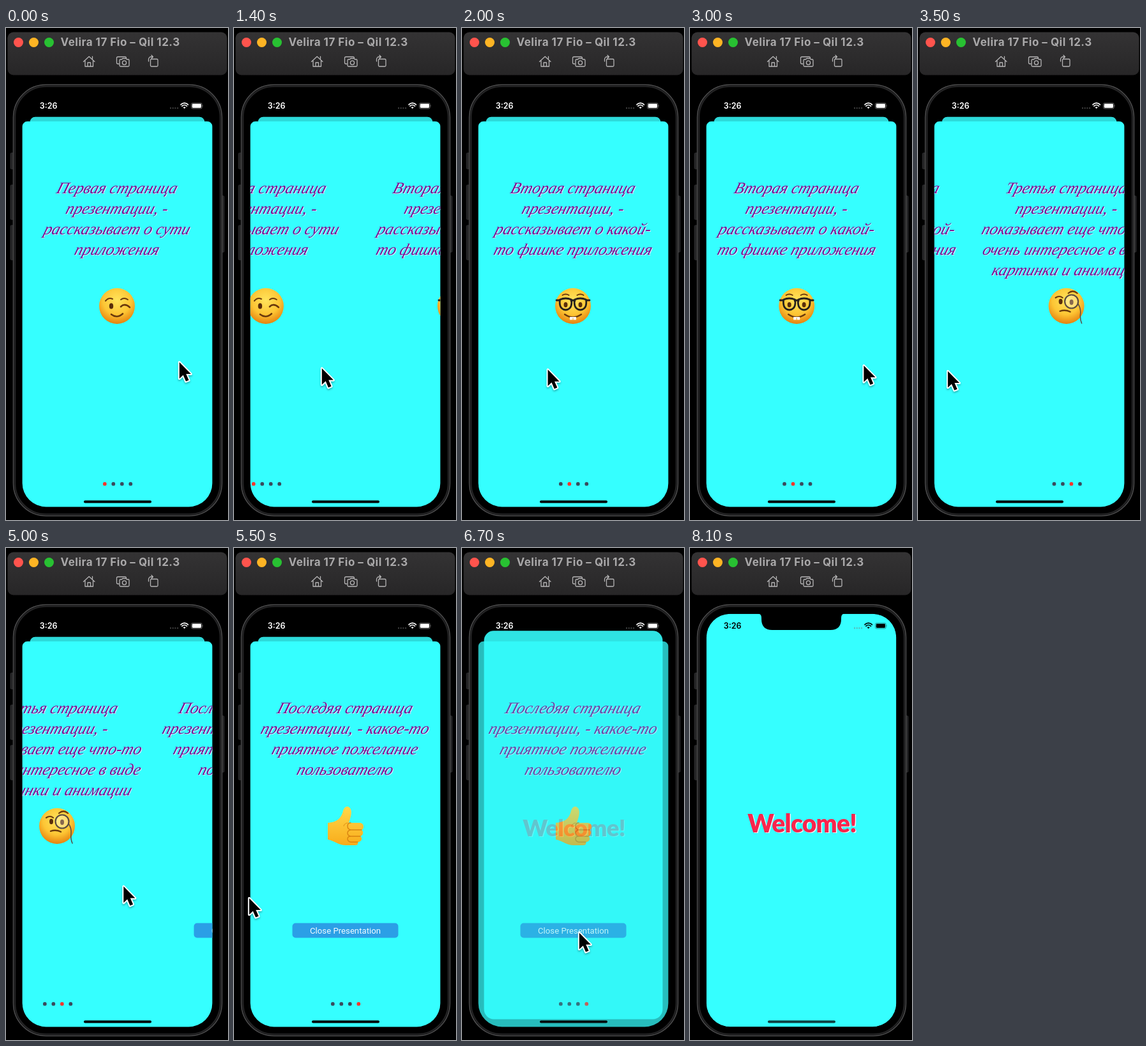
These frames come from a looping animation (348 px wide and 768 px high, 8.2 s). An HTML page:

```html
<!DOCTYPE html>
<html lang="ru">
<head>
<meta charset="utf-8">
<title>Presentation</title>
<style>
  html, body { margin: 0; width: 100%; height: 100%; overflow: hidden; background: #000; }
  svg { display: block; width: 348px; height: 768px; }
  .ui { font-family: Inter, Roboto, sans-serif; }
  .script { font: italic 25.2px "Liberation Serif", "Noto Serif", serif; text-anchor: middle; }
  .welcome { font: 900 39px Lato, "Open Sans", sans-serif; letter-spacing: -.8px; text-anchor: middle; }
  .line { fill: none; stroke-linecap: round; stroke-linejoin: round; }
</style>
</head>
<body>
<svg viewBox="0 0 348 768" xmlns="http://www.w3.org/2000/svg">
  <defs>
    <radialGradient id="skin" cx=".5" cy=".34" r=".66">
      <stop offset="0" stop-color="#ffe45c"/>
      <stop offset=".6" stop-color="#fdc534"/>
      <stop offset="1" stop-color="#e5820f"/>
    </radialGradient>
    <linearGradient id="hand" x2="0" y2="1">
      <stop offset="0" stop-color="#ffd84a"/>
      <stop offset="1" stop-color="#f9ac1b"/>
    </linearGradient>
    <linearGradient id="bar" x2="0" y2="1">
      <stop offset="0" stop-color="#343334"/>
      <stop offset="1" stop-color="#272627"/>
    </linearGradient>
    <clipPath id="screen"><rect x="25.600" y="102.700" width="297.800" height="644.700" rx="37"/></clipPath>
    <clipPath id="sheetShape">
      <path d="M25.600 154a8 8 0 0 1 8-8.300H315.400a8 8 0 0 1 8 8V710a37 37 0 0 1-37 37.400H62.600a37 37 0 0 1-37-37z"/>
    </clipPath>
    <filter id="soft" x="-50%" y="-50%" width="200%" height="200%">
      <feDropShadow dx="0" dy="2" stdDeviation="1.5" flood-opacity=".3"/>
    </filter>
  </defs>
  <rect width="348" height="768"/>

  <!-- window bar -->
  <rect x="2.500" y="6.500" width="344" height="67" rx="9" fill="url(#bar)"/>
  <circle cx="19.500" cy="22.500" r="7.500" fill="#ff544d"/>
  <circle cx="43.500" cy="22.500" r="7.500" fill="#fdb424"/>
  <circle cx="67.500" cy="22.500" r="7.500" fill="#28c132"/>
  <text class="ui" x="85.500" y="28.300" font-size="17" font-weight="700" letter-spacing=".5" fill="#aaa9aa">Velira 17 Fio – Qil 12.3</text>
  <g class="line" stroke="#b5b4b5" stroke-width="1.300">
    <path d="M121.500 52.500l8.700-8 8.700 8M124 51v9h12.500v-9M128 60v-6h4.500v6M135.500 48v-3.500"/>
    <path d="M177 56h-1.500a2 2 0 0 1-2-2v-7a2 2 0 0 1 2-2h11a2 2 0 0 1 2 2"/>
    <path d="M179.500 49h2l1.500-1.500h5l1.500 1.500h2a1.500 1.500 0 0 1 1.500 1.500v8a1.500 1.500 0 0 1-1.500 1.500h-12a1.500 1.500 0 0 1-1.500-1.500v-8a1.500 1.500 0 0 1 1.500-1.500z"/>
    <circle cx="185.500" cy="54.300" r="3.100"/>
    <rect x="226.500" y="48.500" width="11.500" height="11.500" rx="1.500"/>
    <path d="M223.500 52v-3a4 4 0 0 1 4-4h2.500M228 42.500l2.500 2.500-2.500 2.500"/>
  </g>

  <!-- phone body -->
  <g fill="#242425" stroke="#39393a" stroke-width=".7">
    <rect x="7" y="195" width="5" height="25" rx="1.500"/>
    <rect x="7" y="245" width="5" height="54" rx="1.500"/>
    <rect x="7" y="308" width="5" height="54" rx="1.500"/>
    <rect x="337" y="262" width="5" height="88" rx="1.500"/>
  </g>
  <rect x="11.500" y="88.500" width="327" height="673" rx="51" stroke="#505051" stroke-width="1.500"/>
  <rect x="14" y="91" width="322" height="668" rx="48.500" fill="none" stroke="#232324" stroke-width="2.500"/>

  <!-- home view -->
  <g clip-path="url(#screen)">
    <g id="home">
      <rect id="homeBg" x="25.600" y="102.700" width="297.800" height="644.700" fill="#35ffff"/>
      <text class="welcome" x="177" y="445" fill="#e4ffff">Welcome!</text>
      <text class="welcome" x="175.500" y="444" fill="#f9244c">Welcome!</text>
      <rect id="dim" x="25.600" y="102.700" width="297.800" height="644.700"/>
    </g>
  </g>
  <path d="M105 102h139q-7 0-7 7v2q0 17-17 17h-91q-17 0-17-17v-2q0-7-7-7z"/>

  <!-- sheet -->
  <g id="sheet" clip-path="url(#sheetShape)">
    <rect x="25" y="145" width="299" height="603" fill="#35ffff"/>
    <g id="pages"></g>
  </g>
  <rect id="homeBar" x="122" y="737.600" width="106" height="3.800" rx="1.900"/>

  <!-- status bar -->
  <g id="status">
    <text class="ui" x="52.800" y="126" font-size="12.500" font-weight="600">3:26</text>
    <path d="M257 125h2m1.700 0h2m1.700 0h2m1.700 0h2" stroke="#777" stroke-opacity=".7" stroke-width="1.700" fill="none"/>
    <path d="M279.700 126l-2-2.100a2.900 2.900 0 0 1 4 0z"/>
    <path class="line" d="M275.900 121.800a5.400 5.400 0 0 1 7.600 0M274 119.600a8 8 0 0 1 11.400 0" stroke="currentColor" stroke-width="1.700"/>
    <rect x="290.400" y="117" width="17" height="9" rx="2.500" fill="none" stroke="currentColor" stroke-opacity=".45" stroke-width=".8"/>
    <rect x="291.700" y="118.300" width="14.400" height="6.400" rx="1.400"/>
    <path d="M308.300 120v3q1.400-1.500 0-3z" opacity=".5"/>
  </g>

  <path id="cursor" d="M1.800 3.700v25.500l5.900-5.500 4.300 9.900 4.600-1.900-4.300-9.700h7.600z" stroke="#fff" stroke-width="3.800" paint-order="stroke" stroke-linejoin="round" filter="url(#soft)"/>
</svg>

<script>
const $ = id => document.getElementById(id);

const stroke = (d, w = 2.4, color = '#6b3a0c') =>
  `<path class="line" d="${d}" stroke="${color}" stroke-width="${w}"/>`;
const oval = (x, y, rx, ry, fill = '#5a2e0a') =>
  `<ellipse cx="${x}" cy="${y}" rx="${rx}" ry="${ry}" fill="${fill}"/>`;
const face = parts => oval(0, 0, 28, 28, 'url(#skin)') + parts;

// Each emoji is centred on its own origin.
const wink = face(
  oval(-9, 0, 3.2, 4.6) +
  stroke('M-18-8q5-6 11-3M6-10q5-4 11 0', 2) +
  stroke('M6 1q6-6 14 1', 2.6) +
  stroke('M-9 13q9 7 18-1', 2.6));

const lens = '<path class="line" d="M-9-9q9-4 18 0q2 15-9 16q-11-1-9-16z" stroke="#25211d" stroke-width="2.8"/>';
const nerd = face(
  [-11.5, 11.5].map(x => oval(x, -2, 3, 4) +
    `<g transform="translate(${x} -1)">${lens}</g>` + stroke(`M${x - 5}-17q5-3 10 0`, 2)).join('') +
  stroke('M-3-8q3-2 6 0M-26-9h5M21-9h5', 2.8, '#25211d') +
  stroke('M-13 13q13 9 26 0', 2.4) +
  '<path d="M-5 17h10v4.500h-4.500v-3h-1v3h-4.500z" fill="#fff"/>');

const monocle = face(
  oval(-9, -7, 3, 4.2) + oval(8, -6, 3, 4.2) +
  stroke('M-17-13q6-4 11 0M3-20q7-6 14 0', 2.2) +
  '<circle cx="8" cy="-7" r="10.5" fill="#fff" fill-opacity=".28" stroke="#594b42" stroke-width="2.2"/>' +
  stroke('M18-4q5 8 4 16t2 15', 1.5, '#594b42') +
  stroke('M-10 8q8-3 16 1', 2.4));

const thumb =
  '<path d="M-27-5C-15-6-8-10-4-20Q-2-31 4-30.5Q12-28 9-15Q7-8 6-5H24Q29-4 29 1Q29 5 26 6Q30 9 27 14Q25 16 24 16Q28 19 25 23Q23 25 20 25Q22 30 15 30H1C-10 30-14 24-27 21z" fill="url(#hand)"/>' +
  stroke('M26 6H9q-5-1-5-6t5-5M24 16H9q-5-1-5-5t5-5M20 25H9q-5-1-5-5t5-4', 1.4, '#d98410') +
  stroke('M4-5q-5 1-6 5', 1.2, '#e49a1c');

const button =
  '<rect x="91.5" y="585.5" width="166" height="23" rx="5" fill="#2b9fe6"/>' +
  '<text x="174.500" y="601.700" font-family="Roboto, sans-serif" font-size="13.200" fill="#f2fbff" text-anchor="middle">Close Presentation</text>';

const pages = [
  { lines: ['Первая страница', 'презентации, -', 'рассказывает о сути', 'приложения'], emoji: wink },
  { lines: ['Вторая страница', 'презентации, -', 'рассказывает о какой-', 'то фишке приложения'], emoji: nerd },
  { lines: ['Третья страница', 'презентации, -', 'показывает еще что-то', 'очень интересное в виде', 'картинки и анимации'], emoji: monocle },
  { lines: ['Последяя страница', 'презентации, - какое-то', 'приятное пожелание', 'пользователю'], emoji: thumb, extra: button }
];

const scriptLine = (text, i) => {
  const put = (shift, color) =>
    `<text class="script" fill="${color}" transform="translate(${172 + shift} ${257.5 + 32 * i + shift}) skewX(-17)">${text}</text>`;
  return put(1.2, '#c4f0ff') + put(0, '#800b91');
};

const dots = active => pages.map((_, i) =>
  oval(154.8 + 13.5 * i, 711.7, 2.9, 2.9, i === active ? '#f5352b' : '#3a4a5c')).join('');

const PAGE = 297;
$('pages').innerHTML = pages.map((p, i) =>
  `<g transform="translate(${PAGE * i})">${p.lines.map(scriptLine).join('')}` +
  `<g transform="translate(174 434)">${p.emoji}</g>${p.extra || ''}${dots(i)}</g>`).join('');

// Motion, in ms: three swipes, the pointer's way back, then the sheet fades out.
const LOOP = 8200, STEP = 100, SWIPE = 800, BACK = 720;
const swipes = [
  { start: 1044, from: [270, 518], to: [60, 533] },
  { start: 2928, from: [278, 523], to: [45, 532] },
  { start: 4700, from: [284, 513], to: [22, 543] }
];
const buttonSpot = [182, 597];

const ramp = (t, start, span) => Math.min(1, Math.max(0, (t - start) / span));
const smooth = k => k * k * (3 - 2 * k);
const easeOut = k => Math.sin(k * Math.PI / 2);
const mix = (a, b, k) => a.map((v, i) => v + (b[i] - v) * k);

const swiped = (t, s) => PAGE * smooth(ramp(t, s.start, SWIPE));
const scrollAt = t => swipes.reduce((sum, s) => sum + swiped(t, s), 0);

// The pointer runs slightly ahead of the page until it is let go.
function pointerAt(t) {
  let i = swipes.length - 1;
  while (i > 0 && t < swipes[i - 1].start + SWIPE + BACK) i--;
  const s = swipes[i], next = i + 1 < swipes.length ? swipes[i + 1].from : buttonSpot;
  const drag = Math.min(1, 1.08 * swiped(t, s) / (s.from[0] - s.to[0]));
  return mix(mix(s.from, s.to, drag), next, easeOut(ramp(t, s.start + SWIPE, BACK)));
}

const set = (id, attrs) => {
  for (const name in attrs) $(id).setAttribute(name, attrs[name]);
};

function draw(t) {
  const p = smooth(ramp(t, 6540, 480));
  const rx = 9 + 28 * p, ink = p > .6 ? '#000' : '#fff';
  set('cursor', { transform: `translate(${pointerAt(t)})`, visibility: t < 7200 ? 'visible' : 'hidden' });
  set('pages', { transform: `translate(${-scrollAt(t)})` });
  set('sheet', { opacity: 1 - p });
  set('home', { transform: `translate(174.5 ${138.7 - 36 * p}) scale(${.919 + .081 * p}) translate(-174.5 -102.7)` });
  set('homeBg', { rx });
  set('dim', { rx, opacity: .15 * (1 - p) });
  set('homeBar', { opacity: 1 - .25 * p });
  set('status', { fill: ink, color: ink });
}

const begin = performance.now();
function tick(now) {
  const t = Math.max(0, now - begin) % LOOP;
  draw(Math.floor(t / STEP) * STEP);
  requestAnimationFrame(tick);
}
draw(0);
requestAnimationFrame(tick);
</script>
</body>
</html>
```
